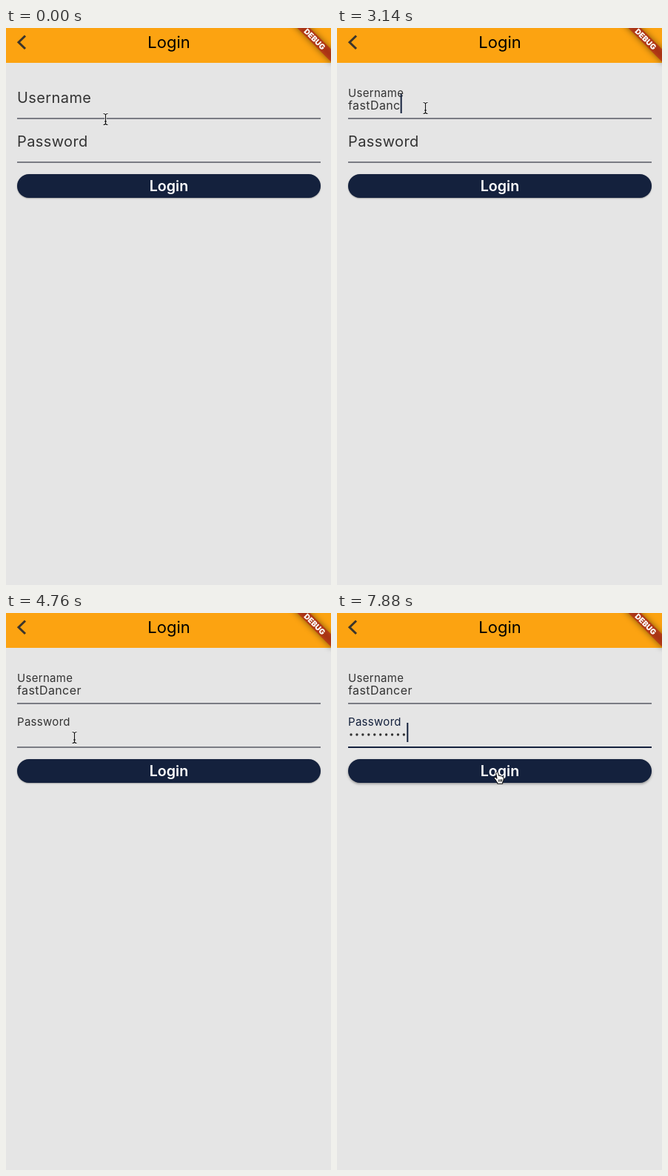
An HTML page with a canvas that plays this animation: 439x751 px, repeating every 8000 ms.

```html
<!DOCTYPE html>
<html lang="en">
<head>
<meta charset="utf-8">
<title>Login</title>
<style>
html, body { margin: 0; width: 100%; height: 100%; overflow: hidden; background: #e5e5e5; }
canvas { display: block; width: 439px; height: 751px; }
</style>
</head>
<body>
<canvas id="stage"></canvas>
<script>
const W = 439, H = 751, LOOP = 8000, STEP = 148.6;
const NAVY = '#14213d', ORANGE = '#fca311', PAPER = '#e5e5e5', INK = '#333333', LINE = '#7a7c84';
const USER = 'fastDancer', DOT_PITCH = 7.93;
const canvas = document.getElementById('stage');
const dpr = window.devicePixelRatio || 1;
canvas.width = W * dpr;
canvas.height = H * dpr;
const ctx = canvas.getContext('2d');

// Mouse glides: eased from a to b, sagging downwards on the way.
const glides = [
  { start: 0, end: 297, a: [134, 123], b: [119, 108], sag: 0 },
  { start: 3715, end: 4160, a: [115, 179], b: [92, 168], sag: 23 },
  { start: 7150, end: 7870, a: [92, 168], b: [218, 222], sag: 14 }
];

const clamp = (v, lo, hi) => Math.min(hi, Math.max(lo, v));
const within = (t, a, b) => t >= a && t < b;
const stepped = t => Math.floor(t / STEP) * STEP;

function pointerAt(t) {
  const { start, end, a, b, sag } = glides.findLast(g => t >= g.start);
  const u = clamp((t - start) / (end - start), 0, 1);
  const p = u * (2 - u);
  return [a[0] + (b[0] - a[0]) * p, a[1] + (b[1] - a[1]) * p + sag * Math.sin(Math.PI * u)];
}

// Keys pressed by time t, the opening ones together, then one every gap.
function keys(t, start, gap, opening, total) {
  return t < start ? 0 : Math.min(total, opening + Math.floor((t - start) / gap));
}

function setFont(size, weight = 400, spacing = 0) {
  ctx.font = `${weight} ${size}px Inter, Roboto, sans-serif`;
  ctx.letterSpacing = spacing + 'px';
}

function text(str, x, y, color, align = 'left') {
  ctx.fillStyle = color;
  ctx.textAlign = align;
  ctx.fillText(str, x, y);
}

function rect(x, y, w, h, color) {
  ctx.fillStyle = color;
  ctx.fillRect(x, y, w, h);
}

function field(name, top, floating, focused) {
  const size = floating ? 15 : 20;
  setFont(size, 400, size * 0.02);
  text(name, 15, top + (floating ? 12 : 20), focused ? NAVY : INK);
  rect(15, top + 40, 410, 2, focused ? NAVY : LINE);
}

function caret(x, top) {
  rect(x, top + 8, 2, 26, NAVY);
}

function banner() {
  ctx.save();
  ctx.translate(417, 15);
  ctx.rotate(Math.PI / 4);
  ctx.filter = 'blur(4px)';
  rect(-40, -6, 80, 12, 'rgba(0,0,0,.5)');
  ctx.filter = 'none';
  rect(-40, -6, 80, 12, 'rgba(183,28,28,.63)');
  setFont(10.2, 900);
  text('DEBUG', 0, 3.8, '#fff', 'center');
  ctx.restore();
}

function appBar() {
  rect(0, 0, W, 47, ORANGE);
  ctx.strokeStyle = '#3c352b';
  ctx.lineWidth = 3;
  ctx.beginPath();
  ctx.moveTo(26, 10.5);
  ctx.lineTo(17, 19.3);
  ctx.lineTo(26, 28);
  ctx.stroke();
  setFont(22);
  text('Login', 220, 27, '#000', 'center');
  banner();
}

function button(lift) {
  ctx.save();
  ctx.shadowColor = 'rgba(0,0,0,.35)';
  ctx.shadowBlur = 2 * lift * dpr;
  ctx.shadowOffsetY = lift * dpr;
  ctx.fillStyle = NAVY;
  ctx.beginPath();
  ctx.roundRect(15, 197, 410, 32, 16);
  ctx.fill();
  ctx.restore();
  setFont(19.7, 600);
  text('Login', 220, 220, '#fff', 'center');
}

const beam = new Path2D('M-3 -7.5 Q-.5 -7.5 0 -6 Q.5 -7.5 3 -7.5 M0 -6 V6 M-3 7.5 Q-.5 7.5 0 6 Q.5 7.5 3 7.5 M-1.5 3 H1.5');
const hand = new Path2D('M-3.4 -7 Q-2 -8.6 -1 -6.6 L.2 -2.6 Q1.6 -3.6 2.6 -2.1 Q4 -2.9 4.8 -1.2 Q6.6 -1.4 6.7 1 Q6.8 4.4 5.2 6.2 V8.2 H-1.8 V6.6 Q-3.4 5 -4.4 3 L-6.2 .8 Q-6.4 -1 -4.4 -.5 L-2.4 1.3 L-3.8 -5.4 Z M.2 2.4 V5.6 M2.2 2.2 V5.6 M4 2.2 V5.4');

function stroke(path, color, width) {
  ctx.strokeStyle = color;
  ctx.lineWidth = width;
  ctx.stroke(path);
}

function drawPointer(x, y, overButton) {
  ctx.save();
  ctx.translate(x + 0.5, y);
  ctx.lineJoin = 'round';
  if (overButton) {
    ctx.fillStyle = '#fff';
    ctx.fill(hand);
    stroke(hand, '#000', 1);
  } else {
    stroke(beam, 'rgba(255,255,255,.8)', 2.8);
    stroke(beam, '#111', 1.2);
  }
  ctx.restore();
}

function userField(t) {
  const top = 81, now = stepped(t);
  const count = keys(now, 1700, 215, 2, 4) + keys(now, 2670, 148, 1, 6);
  const name = USER.slice(0, count);
  field('Username', top, t >= 750, false);
  setFont(16, 400, 0.4);
  text(name, 15, top + 29, INK);
  if (within(t, 750, 1490) || within(t, 1790, 4320)) {
    caret(15 + ctx.measureText(name).width, top);
  }
}

function passwordField(t) {
  const top = 140, count = keys(stepped(t), 5300, 190, 2, 10);
  field('Password', top, t >= 4320, t >= 7300);
  ctx.fillStyle = INK;
  for (let i = 0; i < count; i++) {
    ctx.beginPath();
    ctx.arc(19 + DOT_PITCH * i, 164, 1.7, 0, 2 * Math.PI);
    ctx.fill();
  }
  if (within(t, 4320, 4760) || t >= 5360) caret(15 + DOT_PITCH * count, top);
}

function draw(t) {
  const [x, y] = pointerAt(stepped(t));
  const overButton = y > 197;
  ctx.setTransform(dpr, 0, 0, dpr, 0, 0);
  rect(0, 0, W, H, PAPER);
  appBar();
  userField(t);
  passwordField(t);
  button(overButton ? 1.6 : 0.8);
  drawPointer(x, y, overButton);
}

const start = performance.now();
function tick() {
  draw((performance.now() - start) % LOOP);
  requestAnimationFrame(tick);
}
tick();
</script>
</body>
</html>
```
